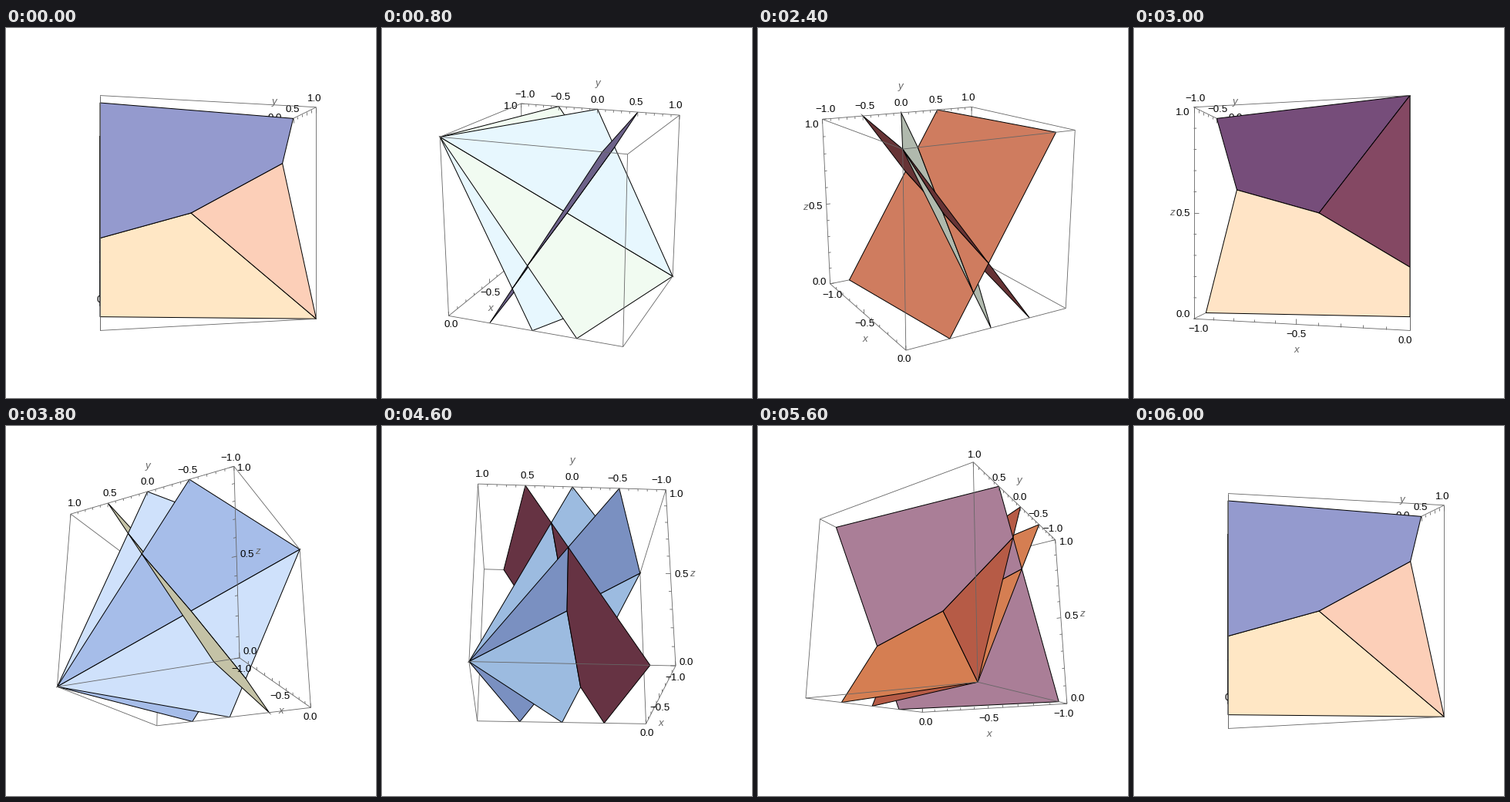
Write a matplotlib script that moves like this. It is 480x480 px and loops after 6.1 s.

```python
import itertools
import math

import matplotlib.pyplot as plt
import numpy as np
from matplotlib.animation import FuncAnimation
from matplotlib.collections import LineCollection
from matplotlib.patches import Polygon

SIZE, DPI = 480, 100
FRAMES, INTERVAL = 61, 100
SCALE = 231
PX = 72 / DPI
GREY = "0.4"

plt.rcParams["font.family"] = "Liberation Sans"

# The box is a unit cube about the origin; all planes pass through its centre.
NORMALS = np.array([[1, 4, 3], [1, 2, 1], [1, -8, 5]], float)
NORMALS /= np.linalg.norm(NORMALS, axis=1, keepdims=True)

# Coloured lights fixed to the viewer: (colour, direction).
AMBIENT = np.array([0.4, 0.2, 0.2])
LIGHTS = [
    ((0, 0.18, 0.5), (2, 0, 2)),
    ((0.18, 0.5, 0.18), (2, 2, 3)),
    ((0.5, 0.18, 0), (0, 2, 2)),
    ((0, 0, 0.18), (0, 0, 2)),
]

# name, direction index, corner, first value, last value
AXES = [
    ("x", 0, (-0.5, -0.5, -0.5), -1, 0),
    ("y", 1, (-0.5, -0.5, 0.5), -1, 1),
    ("z", 2, (-0.5, -0.5, -0.5), 0, 1),
]


def unit(v):
    return v / max(np.linalg.norm(v), 1e-9)


def clip(poly, normal, limit):
    """Keep the part of a convex polygon where normal . p <= limit."""
    out = []
    for p, q in zip(poly, poly[1:] + poly[:1]):
        a, b = normal @ p - limit, normal @ q - limit
        if a <= 1e-9:
            out.append(p)
        if (a < -1e-9 and b > 1e-9) or (a > 1e-9 and b < -1e-9):
            out.append(p + (q - p) * a / (a - b))
    return out


def make_pieces():
    """Cut every plane to the box and along the two other planes."""
    pieces = []
    for i, n in enumerate(NORMALS):
        u = unit(np.cross(n, [0.3, 0.1, 1]))
        v = np.cross(n, u)
        sheet = [3 * (a * u + b * v) for a, b in ((1, 1), (-1, 1), (-1, -1), (1, -1))]
        for axis, sign in itertools.product(range(3), (-1, 1)):
            sheet = clip(sheet, sign * np.eye(3)[axis], 0.5)
        others = [j for j in range(3) if j != i]
        for signs in itertools.product((-1, 1), repeat=2):
            poly, sides = sheet, [0, 0, 0]
            for j, s in zip(others, signs):
                poly = clip(poly, -s * NORMALS[j], 0)
                sides[j] = s
            if len(poly) > 2:
                pieces.append((i, np.array(sides), np.array(poly)))
    return pieces


PIECES = make_pieces()


class Camera:
    def __init__(self, t):
        s, c = math.sin(t), math.cos(t)
        self.eye = np.array([0.5 + 4.82 * s, 2.39 * c, 1.92 * s])
        self.dist = np.linalg.norm(self.eye)
        fwd = -self.eye / self.dist
        right = unit(np.cross(fwd, [0, 0, 1]))
        self.basis = np.array([right, np.cross(right, fwd), -fwd])

    def project(self, pts):
        x, y, z = self.basis @ np.asarray(pts, float).T
        k = SCALE * self.dist / (self.dist - z)
        return np.array([SIZE / 2 + k * x, SIZE / 2 - k * y]).T

    def shade(self, i):
        n = self.basis @ NORMALS[i]
        n = n * (1 if NORMALS[i] @ self.eye > 0 else -1)
        colour = AMBIENT.copy()
        for tint, way in LIGHTS:
            colour += np.array(tint) * max(0, n @ unit(np.array(way, float)))
        return np.clip(colour, 0, 1)

    def is_back(self, corner, along):
        """True when both faces meeting at the edge look away."""
        return not any(
            self.eye[j] * np.sign(corner[j]) > 0.5 + 1e-6
            for j in range(3) if j != along
        )


fig = plt.figure(figsize=(SIZE / DPI, SIZE / DPI), dpi=DPI, facecolor="white")
ax = fig.add_axes([0, 0, 1, 1])


def lines(segments, z):
    ax.add_collection(LineCollection(segments, colors=GREY, linewidths=0.85 * PX, zorder=z))


def label(pos, text, z, **style):
    ax.text(*pos, text, fontsize=13.3 * PX, ha="center", va="center", zorder=z, **style)


def draw_box(cam):
    for along in range(3):
        for a, b in itertools.product((-0.5, 0.5), repeat=2):
            ends = np.insert([[a, b], [a, b]], along, [-0.5, 0.5], axis=1)
            lines([cam.project(ends)], 1 if cam.is_back(ends[0], along) else 50)


def draw_axis(cam, name, along, corner, first, last):
    z = 2 if cam.is_back(corner, along) else 51
    count = round((last - first) * 10)
    pts = np.tile(np.array(corner, float), (count + 1, 1))
    pts[:, along] = np.linspace(-0.5, 0.5, count + 1)
    mid3 = np.array(corner, float)
    mid3[along] = 0
    mid = cam.project([mid3])[0]

    def reach(d):
        return cam.project([mid3 + d])[0] - mid

    if name == "z":
        inward = max(np.eye(3)[:2], key=lambda d: np.linalg.norm(reach(d)))
        gap, name_gap = 14, 28
    else:
        inward = np.array([0, 0, -np.sign(corner[2])])
        gap, name_gap = 12.8, 33.5
    out = -unit(reach(inward))

    majors = np.arange(count + 1) % 5 == 0
    length = np.where(majors, 0.025, 0.014)[:, None]
    flat = cam.project(pts)
    lines(np.stack([flat, cam.project(pts + length * inward)], axis=1), z)
    for k in np.flatnonzero(majors):
        pos = flat[k] + 0.045 * (mid - flat[k]) + gap * out
        text = f"{first + k / 10:.1f}".replace("-", "\u2212")
        label(pos + [0, 1], text, z, color="black")
    label(mid + name_gap * out, name, z, color=GREY, style="italic")


def draw_spikes(poly, flat, z):
    """Long mitred tips at sharp corners; nothing ever hides the centre."""
    before, after = np.roll(flat, 1, axis=0), np.roll(flat, -1, axis=0)
    for corner, a, p, b in zip(poly, before, flat, after):
        u, v = unit(a - p), unit(b - p)
        half = math.sqrt(max(0, (1 - u @ v) / 2))
        if 0.1 <= half <= 0.25:
            tip = -unit(u + v)
            side = np.array([-tip[1], tip[0]]) * 0.5
            at_centre = np.linalg.norm(corner) < 1e-6
            ax.add_patch(Polygon([p + side, p + tip * 0.5 / half, p - side],
                                 facecolor="black", edgecolor="none",
                                 zorder=40 if at_centre else z))


def draw_planes(cam):
    facing = np.sign(NORMALS @ cam.eye)
    order = sorted(PIECES, key=lambda piece: tuple(piece[1] * facing))
    for z, (i, _, poly) in enumerate(order, 10):
        flat = cam.project(poly)
        ax.add_patch(Polygon(flat, facecolor=cam.shade(i), edgecolor="black",
                             linewidth=1.0 * PX, joinstyle="miter", zorder=z))
        draw_spikes(poly, flat, z)


def update(frame):
    ax.cla()
    ax.set_axis_off()
    ax.set_xlim(0, SIZE)
    ax.set_ylim(SIZE, 0)
    cam = Camera(2 * math.pi * frame / (FRAMES - 1))
    draw_box(cam)
    for spec in AXES:
        draw_axis(cam, *spec)
    draw_planes(cam)
    return []


anim = FuncAnimation(fig, update, frames=FRAMES, interval=INTERVAL,
                     repeat=True, repeat_delay=0, blit=False)
plt.show()
```
